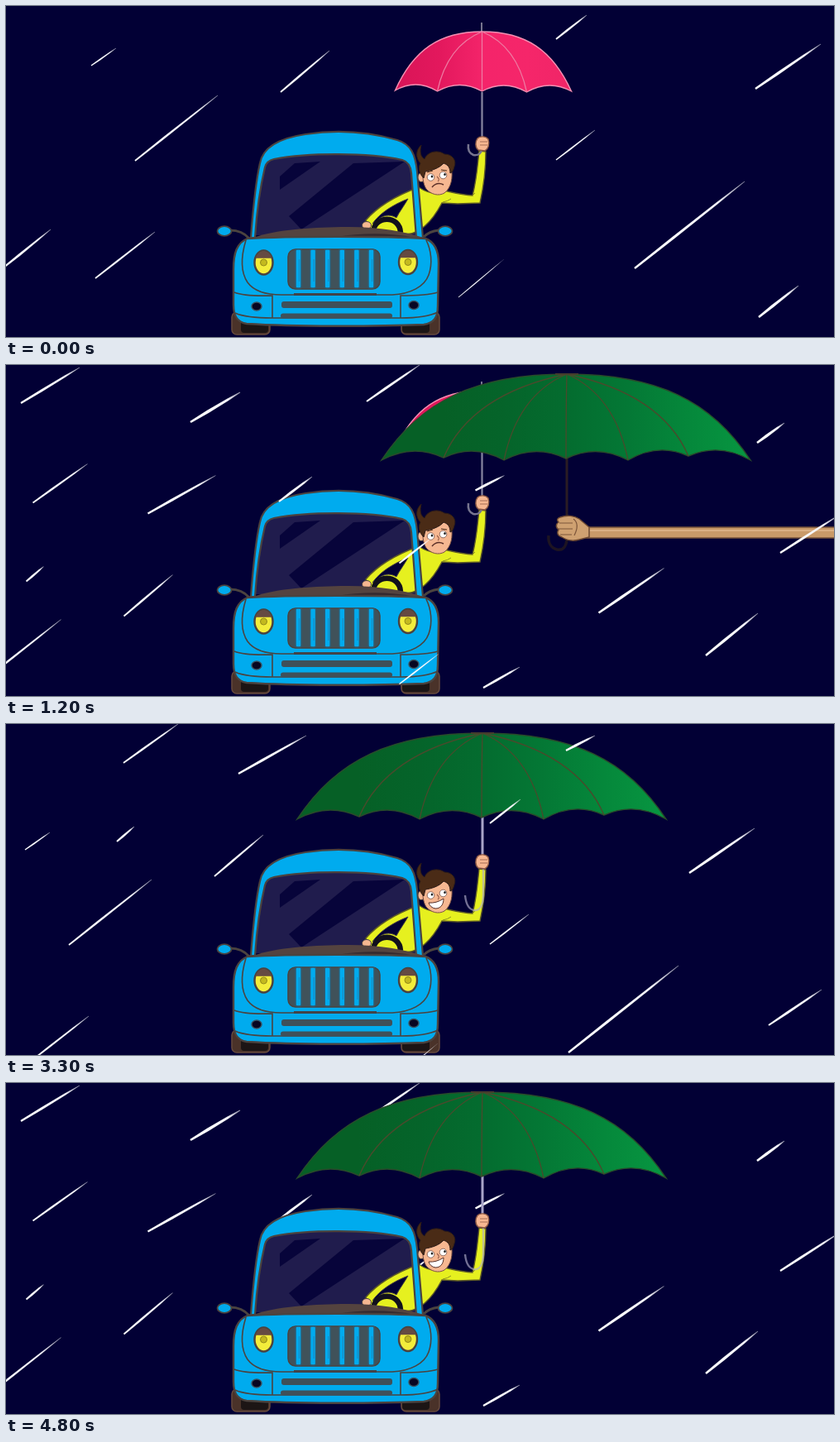
An HTML page with a canvas that plays this animation: 1001 by 400 pixels, repeating every 5100 ms.

```html
<!DOCTYPE html>
<html lang="en">
<head>
<meta charset="utf-8">
<title>Rainy drive</title>
<style>
html, body { margin: 0; width: 100%; height: 100%; overflow: hidden; background: #020035; }
canvas { display: block; width: 100vw; height: 100vh; }
</style>
</head>
<body>
<canvas id="stage" width="1001" height="400"></canvas>
<script>
const ctx = document.getElementById('stage').getContext('2d');
const STEP = 300, FRAMES = 17;
const NIGHT = '#020035', BLUE = '#00abee', LINE = '#4b433f', YELLOW = '#e6f01f', SKIN = '#f6b791';

function shape(d, fill, stroke, width = 1.5) {
  const p = new Path2D(d);
  if (fill) { ctx.fillStyle = fill; ctx.fill(p); }
  if (stroke) { ctx.strokeStyle = stroke; ctx.lineWidth = width; ctx.stroke(p); }
}

function oval(x, y, rx, ry, fill, stroke, width = 1.5) {
  ctx.beginPath();
  ctx.ellipse(x, y, rx, ry, 0, 0, Math.PI * 2);
  if (fill) { ctx.fillStyle = fill; ctx.fill(); }
  if (stroke) { ctx.strokeStyle = stroke; ctx.lineWidth = width; ctx.stroke(); }
}

function box(x, y, w, h, r, fill, stroke) {
  ctx.beginPath();
  ctx.roundRect(x, y, w, h, r);
  ctx.fillStyle = fill;
  ctx.fill();
  if (stroke) { ctx.strokeStyle = stroke; ctx.lineWidth = 1.5; ctx.stroke(); }
}

function blend(x0, x1, ...colors) {
  const g = ctx.createLinearGradient(x0, 0, x1, 0);
  colors.forEach((c, i) => g.addColorStop(i / (colors.length - 1), c));
  return g;
}

// Each wave of drops: x, y of the thick end, run, rise, thickness
const waves = [
  [[103, 72, 30, 21, 1.8], [156, 187, 100, 79, 2.5], [332, 104, 59, 50, 2.5], [665, 40, 37, 29, 2.6],
   [906, 100, 79, 54, 3.5], [665, 186, 47, 36, 1.9], [760, 317, 133, 105, 3.2], [910, 376, 48, 38, 3.4],
   [547, 352, 55, 46, 1.3], [108, 329, 72, 56, 2.3], [-4, 317, 58, 47, 2.8]],
  [[142, 47, 66, 47, 2.5], [281, 60, 82, 46, 3], [134, 142, 21, 18, 2.6], [677, 32, 35, 18, 3.2],
   [922, 364, 64, 43, 3]],
  [[18, 46, 71, 43, 3], [223, 69, 60, 36, 3.6], [436, 44, 64, 44, 3], [330, 165, 40, 30, 3],
   [908, 94, 33, 24, 3.6], [936, 227, 70, 45, 3], [846, 351, 63, 51, 3.4], [577, 390, 44, 25, 3]]
];
const fall = [[0, 0], [-80, 80], [-189.5, 199.5]];

function drop(x, y, run, rise, w) {
  const len = Math.hypot(run, rise), nx = rise / len * w / 2, ny = run / len * w / 2;
  const side = (t, k) => ctx.lineTo(x + run * t + nx * k, y - rise * t + ny * k);
  const g = ctx.createLinearGradient(x, y, x + run, y - rise);
  g.addColorStop(0, '#fff');
  g.addColorStop(.75, '#f4f4fa');
  g.addColorStop(1, 'rgba(255,255,255,.55)');
  ctx.fillStyle = g;
  ctx.beginPath();
  side(0, -.7);
  side(.35, -1);
  side(.75, -.75);
  side(1, -.25);
  side(1, .25);
  side(.75, .75);
  side(.35, 1);
  side(0, .7);
  ctx.fill();
}

function rain(state) {
  for (let k = 0; k <= state; k++) {
    const dx = fall[state][0] - fall[k][0], dy = fall[state][1] - fall[k][1];
    for (const [x, y, run, rise, w] of waves[k]) drop(x + dx, y + dy, run, rise, w);
  }
}

// Canopy with scalloped hem; tips run from left to right
function canopy(top, tips, hem, fill, edge, rib) {
  const [lx, ly] = tips[0], [rx, ry] = tips[tips.length - 1];
  let d = `M${lx} ${ly}C${lx * .79} ${top + (ly - top) * .31} ${lx * .49} ${top} 0 ${top}` +
    `C${rx * .49} ${top} ${rx * .79} ${top + (ry - top) * .31} ${rx} ${ry}`;
  for (let i = tips.length - 2; i >= 0; i--) {
    const [ax, ay] = tips[i + 1], [bx, by] = tips[i];
    d += `Q${(ax + bx) / 2} ${(ay + by) / 2 - hem} ${bx} ${by}`;
  }
  shape(d + 'Z', fill, edge, 1.4);
  for (const [x, y] of tips.slice(1, -1)) {
    shape(`M0 ${top}Q${x * .78} ${top + (y - top) * .24} ${x} ${y}`, null, rib, 1.3);
  }
}

function pinkUmbrella() {
  ctx.save();
  ctx.translate(575.5, 0);
  shape('M-.5 20V32', null, '#77758f', 2);
  canopy(31, [[-105, 102], [-54, 103], [0, 103], [54, 104], [108, 103]], 15,
    blend(-105, 108, '#d91457', '#e3185d', '#f4246a', '#f5266a', '#f02567'), '#f58fb2', '#ee7ba2');
  shape('M0 104V160', null, '#8886a2', 2.2);
  ctx.restore();
}

function greenUmbrella(x, held) {
  ctx.save();
  ctx.translate(x, 0);
  const pole = held ? '#a9a5c8' : '#2b1c24';
  shape('M0 108V' + (held ? 160 : 190), null, pole, 3);
  canopy(11, [[-224, 115], [-149, 112], [-76, 115], [-1, 113], [74, 115], [147, 110], [222, 115]], 19,
    blend(-224, 222, '#066026', '#066026', '#05642a', '#046c2f', '#047835', '#05883b', '#079641'), '#284b2a', '#4a4a2c');
  shape('M-14 11H14', null, '#453d2c', 2);
  ctx.restore();
}

function helperArm(x) {
  ctx.save();
  ctx.translate(x, 0);
  shape('M0 205C1 218-4 225-12 223C-19 221-23 215-22 206', null, '#1d1422', 3.5);
  shape('M24 196H1001V209H24Z', '#c99a69', '#76513a', 1.5);
  shape('M26 200H1001', null, '#dbb084', 2);
  shape('M-8 184C0 181 9 182 15 186L27 196V208L15 211C8 213 0 212-6 208C-12 206-12 202-10 199C-14 196-13 192-10 190C-13 187-11 185-8 184Z',
    '#cfa171', '#6d4932', 1.5);
  shape('M-9 191H7M-10 198H7M-8 205H6M8 186Q16 192 9 206', null, '#7d563b', 1.2);
  ctx.restore();
}

function face(happy) {
  oval(502, 207, 4, 5.5, SKIN, LINE, 1);
  shape('M504 195C504 187 535 185 538 195C541 207 538 220 530 226C523 230 514 228 508 221C504 215 503 204 504 195Z', SKIN, '#7b5143', 1);
  shape('M502 168C500 176 501 182 506 185C509 176 522 173 530 179C540 179 545 187 542 194C541 198 540 201 537 202C537 196 535 192 529 190C524 196 514 199 507 200L505 208C499 202 498 195 501 190C495 184 495 174 502 168Z',
    '#4a2b16', '#2b1b18', 1);
  oval(513.5, 207, 4.3, 4.3, '#fff', '#77534a', .8);
  oval(528.5, 204.5, 4.3, 4.3, '#fff', '#77534a', .8);
  oval(515, 206, 1.3, 1.5, '#222');
  oval(530.5, 203.5, 1.3, 1.5, '#222');
  shape('M521 206Q525 210 522 212', null, '#9a604b', 1.1);
  if (happy) {
    shape('M511 216Q520 217 529 211C529 219 525 223 519 223Q513 222 511 216Z', '#fff', '#573028', 1);
  } else {
    shape('M509 201L516 199M526 198L533 199', null, '#4a2b16', 1.1);
    shape('M515 219Q521 212 529 216', null, '#5b2f28', 1.5);
  }
}

function driver(happy) {
  shape('M499 219C480 226 452 239 435 259L440 269L452 275H481C498 278 515 261 527 238L546 239L573 238C577 220 580 200 580 176L572 175C570 193 569 210 564 229C550 228 539 225 529 223C519 229 508 225 499 219Z',
    YELLOW, '#5f5c25', 1.4);
  shape('M443 263C452 250 468 240 486 233C481 242 476 248 472 256C462 250 452 254 447 262Z', NIGHT, LINE, 1);
  shape('M528 237Q534 236 538 233M563 230L567 226', null, '#8d9223', 1);
  oval(436, 265, 5.5, 4.5, SKIN, LINE, 1);
  shape('M444 273C445 253 476 252 477 274', null, '#11101c', 6.5);
}

function grip(happy) {
  if (happy) {
    shape('M577 172V206C577 219 573 226 566 225C559 224 556 217 555 207', null, 'rgba(176,173,200,.65)', 2.4);
  } else {
    shape('M575 170C576 178 571 181 565 180C560 178 558 174 559 167', null, '#77758f', 2.5);
  }
  shape('M570 160C573 157 580 157 583 161C585 167 583 173 579 175L571 174C567 171 567 164 570 160Z', SKIN, '#8a5744', 1.4);
  shape('M573 164H582M573 168H582', null, '#a56c55', 1);
}

function glass() {
  shape('M299 277C302 240 306 210 311 193Q314 186 322 184C365 176 440 176 481 185Q490 189 492 200L499 278Z', '#201c4d');
  shape('M331 222V206L349 190L380 188ZM342 254L420 190L482 188L357 270Z', '#07043a');
}

function wheel(x, inner) {
  box(x, 370, 46, 27, 6, '#4a3229', '#664a3d');
  box(inner, 370, 33, 25, 4, '#1c1515');
}

function lamp(x, y) {
  oval(x, y, 11, 14.5, '#f3ed3b', LINE, 2.4);
  ctx.beginPath();
  ctx.ellipse(x, y, 10.5, 14, 0, Math.PI * 1.12, Math.PI * 1.88);
  ctx.fillStyle = '#654a42';
  ctx.fill();
  oval(x, y, 4, 4, '#c3b91f', '#93891b', 1);
}

function mirror(x, arm) {
  shape(arm, null, LINE, 3);
  oval(x, 272, 8.5, 5.8, BLUE, LINE, 1.8);
}

function car() {
  // Cab frame with the window left open
  shape('M296 280C299 240 302 212 307 190C311 168 335 159 362 155C395 150 435 151 473 162C490 167 495 180 497 200L504 280H496L490 202Q489 189 479 186C438 177 366 177 324 185Q315 187 313 195C307 220 303 250 301 280Z',
    BLUE, LINE, 2.2);

  shape('M299 280C327 270 365 268 405 267C447 266 481 272 505 280V284H298Z', '#54433f');
  shape('M400 279C430 274 465 274 494 280Z', '#35292e');
  mirror(264, 'M271 271C281 271 288 274 294 281');
  mirror(531, 'M523 271C515 272 510 274 505 279');
  wheel(273, 284);
  wheel(478, 479);
  shape('M292 281C340 278 460 278 507 281C518 285 523 295 523 311L522 363C522 377 517 383 505 385C440 387.5 350 387.5 291 384C279 382 275 374 275 361V318C275 299 279 286 292 281Z', BLUE, LINE, 2.4);
  shape('M290 283C284 303 284 322 292 334C300 345 315 349 333 349H467C489 348 506 339 511 325C516 311 514 295 508 283M276 346Q288 351 322 350V377M522 346Q509 350 477 350V377M277 371Q290 377 322 377H477Q508 377 522 370', null, LINE, 1.6);

  box(341, 294, 111, 48, 9, '#40525a', LINE);
  for (let i = 0; i < 6; i++) {
    const x = 350 + i * 17.6;
    box(x, 294, 7, 47, 2, BLUE, '#315b70');
    shape(`M${x + 4.5} 306V333`, null, '#178fc7', 1.4);
  }
  shape('M348 348.5H448', null, '#424347', 3);
  box(333, 357, 134, 8, 3, '#3f5059');
  box(332, 371.5, 135, 6, 3, '#3f5059');
  lamp(311.5, 310);
  lamp(486, 309.5);
  oval(303, 363, 6, 5, '#080622', '#395160', 1.5);
  oval(493, 361.5, 6, 5, '#080622', '#395160', 1.5);
}

function draw(frame) {
  const state = [0, 2, 1][frame % 3];
  const happy = frame > 5;
  const rainBehind = happy && state === 2;
  const x = frame < 5 ? 1094 - 104 * frame : 576;

  ctx.fillStyle = NIGHT;
  ctx.fillRect(0, 0, 1001, 400);
  if (rainBehind) rain(state);
  if (!happy) pinkUmbrella();
  if (frame > 0) greenUmbrella(x, happy);
  if (frame > 0 && !happy) helperArm(x);
  glass();
  driver(happy);
  car();
  face(happy);
  grip(happy);
  if (!rainBehind) rain(state);
}

function tick() {
  draw(Math.floor(performance.now() / STEP) % FRAMES);
  requestAnimationFrame(tick);
}
tick();
</script>
</body>
</html>
```
